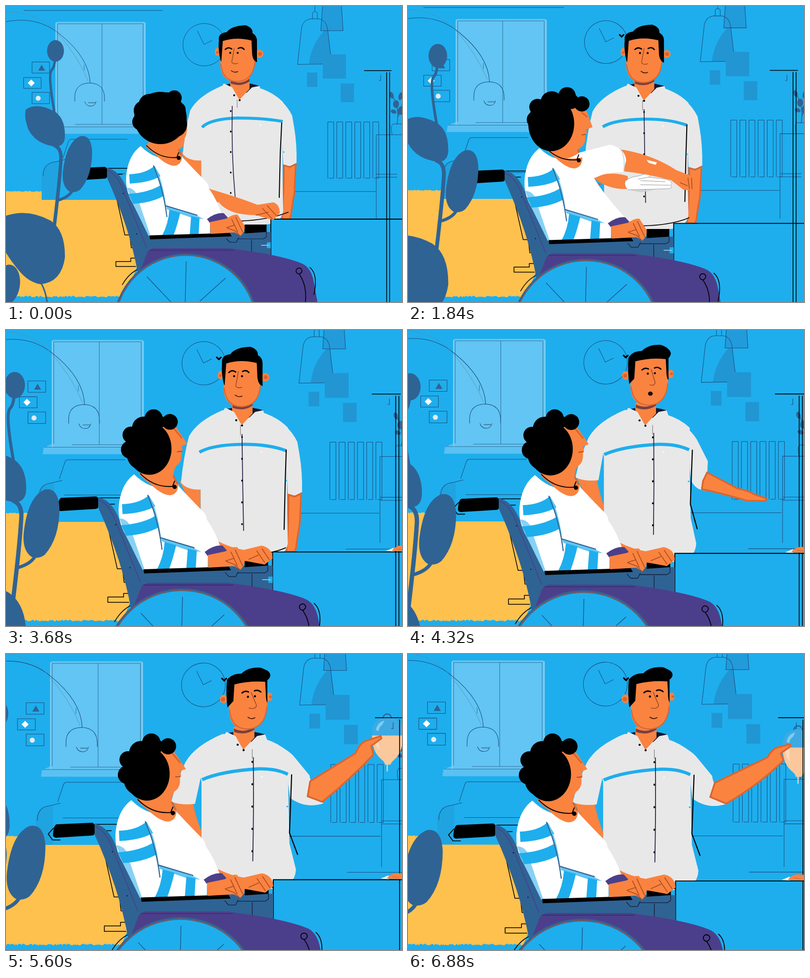
Write an HTML page with a canvas that moves like this. It is 800 px wide and 600 px high and loops after 6960 ms.

```html
<!DOCTYPE html>
<html>
<head>
<meta charset="utf-8">
<style>
html, body { margin: 0; width: 100%; height: 100%; overflow: hidden; background: #1eaeed; }
canvas { display: block; width: 800px; height: 600px; }
</style>
</head>
<body>
<canvas id="stage" width="800" height="600"></canvas>
<script>
const c = document.getElementById('stage').getContext('2d');
const LOOP = 6960, STEP = 80;
const SKY = '#1eaeed', PALE = '#62c5f3', SHADE = '#2196d3', NAVY = '#2f6394', PURPLE = '#4b3f8b',
  SKIN = '#fa8340', DARK = '#d9642f', SHIRT = '#e8e8e8', RUG = '#ffc14d', INK = '#1c4f82', BLACK = '#000';
c.lineCap = c.lineJoin = 'round';

const fill = (d, color) => { c.fillStyle = color; c.fill(new Path2D(d)); };
const line = (d, color = INK, w = 1) => { c.strokeStyle = color; c.lineWidth = w; c.stroke(new Path2D(d)); };
const oval = (x, y, rx, ry, color, turn = 0) => {
  c.fillStyle = color; c.beginPath(); c.ellipse(x, y, rx, ry, turn, 0, 7); c.fill();
};
const dot = (x, y, r, color = BLACK) => oval(x, y, r, r, color);
const box = (x, y, w, h, color) => { c.fillStyle = color; c.fillRect(x, y, w, h); };

// Blend two numbers, or two path strings with the same commands
const NUM = /-?\d+(\.\d+)?/g;
function mix(a, b, k) {
  if (typeof a === 'number') return a + (b - a) * k;
  const to = b.match(NUM);
  let i = 0;
  return a.replace(NUM, n => (+n + (to[i++] - n) * k).toFixed(2));
}
// Keys are time, value, time, value ...
function pose(t, ...keys) {
  let i = 0;
  while (i < keys.length - 2 && t >= keys[i + 2]) i += 2;
  if (i >= keys.length - 2) return keys[i + 1];
  const k = Math.max(0, (t - keys[i]) / (keys[i + 2] - keys[i]));
  return mix(keys[i + 1], keys[i + 3], k * k * (3 - 2 * k));
}
// Slow camera push, each layer with its own depth
const camera = u => (u * u * u - 2 * u * u + u) + (3 * u * u - 2 * u * u * u) + 0.2 * (u * u * u - u * u);
function layer(p, zoom, dx, dy) {
  const s = 1 + (zoom - 1) * p;
  c.setTransform(s, 0, 0, s, dx * p, dy * p);
}
function group(x, y, turn, draw) {
  c.save(); c.translate(x, y); c.rotate(turn); draw(); c.restore();
}

function rug() {
  const rough = x => Math.sin(x * x) * 1.5;
  let d = 'M-40 376';
  for (let x = -38; x <= 72; x += 2) d += `L${x} ${376 + rough(x) * .6}`;
  d += 'V393H268V520L240 590';
  for (let x = 238; x > -40; x -= 2) d += `L${x} ${589 + rough(x)}`;
  fill(d + 'Z', RUG);
}

function room(t, p) {
  layer(p, 1.034, -15.4, -20.1);
  rug();
  line('M36 9H316');
  fill('M72 393V342Q74 318 100 316H120V393Z', '#1fa4e1');
  fill('M105 316H250V393H105Z', SKY);
  line('M75 345Q75 318 100 316L120 311M245 270H132Q128 270 126 275L115 308M125 340H240');
  fill('M84 246L102 238H268V259H82Z', '#5bc1f2');
  fill('M104 32H278Q281 32 281 35V245H101V35Q101 32 104 32Z', PALE);
  line('M104 238V36H277V238M194 36V240M140 240H280M86 245H270', '#31719d');
  line('M101 35V244M281 35V244', '#82d0f5', 2);

  line('M53 113.5H88V136H53ZM36 145H71V167H36ZM53 175H88V198H53Z');
  fill('M72 119L79 131H65Z', NAVY);
  fill('M51 149L58 156L51 163L44 156Z', '#fff');
  dot(65, 187, 5, '#e6eaf0');

  line('M443.5 78.5A43 43 0 1 1 443.5 78.4M387 51L400 78L416 70');
  fill('M612 117Q617 78 643 50L650 50L658 117Z', SHADE);
  fill('M642 -40L636 50H681L675 -40Z', '#229bda');
  line('M589 118L597 45Q600 28 615 26H632Q648 28 650 50L658 117ZM619 26V14Q624 8 629 14V26M624 11V-30M636 50L642 -40M636 50H681L675 -40');
  box(640, 98, 47, 49, SHADE);
  box(608, 135, 21, 29, SHADE);
  box(676, 157, 27, 38, SHADE);
  for (let i = 0; i < 6; i++) {
    const x = 650 + i * 18.2;
    line(`M${x} 349V235H${x + 12}V349H${x + 3}`);
  }
  line('M560 376H747');
  if (t > 1700) line('M682 447H850');

  layer(p, 1.05, -25.6, -20);
  line('M850 261H748V430M748 341H790M748 347H790M780 261Q776 242 782 239H810');
  line('M790 240Q796 205 779 180M792 225Q800 205 802 190', NAVY, 1.5);
  oval(779, 181, 4, 7, NAVY, -.3);
  oval(788, 199, 6, 8, NAVY);
  oval(783, 214, 6, 4, NAVY, .4);
  oval(798, 212, 7, 9, NAVY, .4);
  oval(797, 183, 4, 8, NAVY, .2);

  layer(p, 1.06, -28, -17.4);
  line('M-10 34Q60 16 110 58Q168 105 170 156M139 193V185Q139 157 169 156Q199 157 199 187V193M159 194Q162 203 171 203Q180 203 182 194');
  line('M-10 12Q60 10 100 50Q145 100 166 152', '#5d8aa0', .7);
  line('M167 196H181', '#4a83aa', 2);
  line('M158 119V130', '#1482c6');
}

// The bag tilts while its liquid stays level
function bag(t) {
  if (t < 4300) return;
  const x = pose(t, 4300, 850, 4900, 758, 5000, 756, 5500, 746, 5650, 746, 6300, 760);
  const y = pose(t, 4300, 290, 4900, 252, 5000, 248, 5500, 164, 5650, 164, 6300, 186);
  const tilt = pose(t, 4300, 1, 4960, .9, 5450, 0);
  const skin = new Path2D('M-28 -2V-10Q-25 -33 0 -33Q26 -33 29 -10V-2Q30 30 13 45Q8 49 6 54H-4Q-5 49 -10 45Q-29 30 -28 -2Z');
  group(x, y, 0, () => {
    c.save();
    c.rotate(tilt);
    c.clip(skin);
    c.rotate(-tilt);
    box(-70, -70, 140, 140, '#3fa9e2');
    box(-70, 0, 140, 90, '#fac89c');
    c.restore();
    c.rotate(tilt);
    fill('M-21 -10Q-19 -24 -5 -28L-9 -20Q-15 -16 -16 -8Z', '#7bcdf4');
    fill('M-23 5L-15 3Q-17 18 -14 26Q-23 20 -23 5Z', '#fddabb');
    line('M0 54V66', '#f2d8c2', 2);
    line('M-8 -33Q-6 -40 0 -40Q6 -40 8 -33', NAVY, 2);
  });
}

function manArm(t) {
  const hang = 'M587 318L584 380Q580 400 577 425L574 433L558 433L556 428L558 400Q560 370 560 321L573 325Z';
  const lift = 'M592 285L640 340Q655 350 668 362L690 378L682 384L664 376L650 366Q600 330 575 312L580 298Z';
  const reach = 'M600 261L683 242Q705 228 718 228L754 222L752 230L725 245L711 266Q660 295 602 312L599 288Z';
  const high = 'M602 248L686 196Q695 176 708 172L735 163L737 170L718 184L722 200Q680 245 626 289L597 278Z';
  const hold = 'M606 250L703 203Q712 186 724 184L747 178L747 185L730 197L735 210Q690 255 628 291L597 278Z';
  const arm = pose(t, 0, hang, 3700, hang, 4150, lift, 4600, reach, 4960, reach, 5500, high, 5650, high, 6300, hold);
  const down = 'M515 167Q560 185 578 222L582 245Q588 280 587 320Q572 327 560 323L556 235Z';
  const out = 'M518 170Q556 188 575 215L601 262Q596 290 602 312Q575 312 566 285L560 235Z';
  const up = 'M518 170Q562 188 575 205L602 238Q606 262 628 290Q595 301 566 280L560 235Z';
  bag(t);
  fill(pose(t, 0, down, 3700, down, 4600, out, 4960, out, 5500, up), SHIRT);
  fill(arm, SKIN);
  c.save();
  c.clip(new Path2D(arm));
  line(arm, DARK, 6);
  c.restore();
}

function manHead(t) {
  const look = pose(t, 0, 0, 800, 7, 2900, 7, 3600, 0, 3800, 0, 4500, 0);
  const turn = (a, b) => pose(t, 3800, a, 4500, b);
  const blink = t >= 2560 && t < 2800;
  const talk = t > 4300 && t < 5200 && Math.floor(t / 160) % 2 === 1;
  oval(turn(427, 423), turn(93, 97), turn(5, 7), 8, SKIN);
  oval(turn(512, 508), turn(97, 93), turn(8, 5), 8, SKIN);
  dot(turn(513, 510), turn(97, 93), turn(4, 2.5), DARK);
  dot(turn(427, 422), turn(94, 98), turn(2.5, 4), DARK);
  fill('M433 66V122Q436 154 468 154Q501 152 504 108V62Z', SKIN);
  line('M434 118Q438 153 468 153Q500 151 503 112', DARK, 2);
  fill(turn('M434 112Q428 90 430 70Q428 55 446 53Q455 40 484 39Q499 44 498 55Q508 60 507 74V114Q497 110 497 92L496 70Q465 62 438 71L435 112Z',
    'M430 113Q427 90 429 62Q438 50 456 50Q469 37 492 39Q504 44 506 46Q514 54 504 62V104Q501 100 501 84L500 65Q470 63 443 70L441 101Z'), BLACK);
  group(look, 0, 0, () => {
    line(turn('M443 88Q449 82 456 87M469 86Q476 82 481 88', 'M457 86Q462 81 469 84M480 82Q486 79 492 84'), BLACK, 2.5);
    if (!blink) { dot(turn(453, 468), turn(95, 93), 2); dot(turn(468, 481), turn(95, 92), 2); }
    line(turn('M461 86L456 114Q460 119 468 116', 'M474 85L484 109Q482 117 470 114'), '#a34e26', 1.5);
    if (talk) oval(turn(462, 472), 131, 4.5, 4, '#1b0d0d');
    else line(turn('M455 131Q461 136 468 133', 'M468 131Q474 136 481 132'), '#3c160c', 1.6);
  });
  if (t > 500) line('M420 59L424 63L428 59', BLACK, 3);
}

function man(t) {
  const lean = pose(t, 0, 0, 900, 4, 3700, 4, 4500, 0);
  const C = 4500;
  c.save();
  c.translate(lean, 0);
  const fA = 'M354 296H394Q394 320 394 340V353Q374 342 354 296Z', fC = 'M350 288H386Q392 318 402 342V366Q372 342 350 288Z';
  fill(pose(t, 0, fA, 3700, fA, C, fC), SKIN);
  const tA = 'M436 162Q400 178 385 205L394 250L395 440Q460 452 533 442Q558 436 560 415L559 365L558 235L560 195Q540 175 513 167Z';
  const tC = 'M442 161Q410 172 392 200L402 250L402 440Q460 455 540 448Q575 445 577 413L565 365L562 235L563 195Q545 178 518 170Z';
  const sA = 'M436 162Q388 182 372 212Q362 250 357 300Q370 315 396 313L396 245Q405 200 436 162Z';
  const sC = 'M442 161Q390 182 372 214Q355 250 346 287Q365 294 390 291L400 245Q408 200 442 161Z';
  manArm(t);
  fill(pose(t, 0, tA, 3700, tA, C, tC), SHIRT);
  fill(pose(t, 0, sA, 3700, sA, C, sC), SHIRT);
  c.restore();

  const n = pose(t, 0, 0, 900, 5, 3700, 5, C, 8);
  group(n, 0, 0, () => {
    fill('M438 161Q474 150 512 162L502 176H446Z', '#15162e');
    fill('M453 148V170L472 190L492 168V142Z', SKIN);
    fill('M454 151Q475 161 492 147V153Q474 165 454 157Z', '#77413f');
    fill('M440 157L457 165L470 188V200L440 186L433 168Z', SHIRT);
    fill('M512 162L497 165L488 174L472 190V204L520 185Z', SHIRT);
    dot(461, 181, 2); dot(472, 191, 2);
  });
  line(pose(t, 0, 'M467 190V206', 900, 'M474 190V210', 3700, 'M474 190V210', C, 'M496 190V206'), '#777');

  const stripeA = 'M396 246Q412 229 467 227Q520 227 559 234', stripeB = 'M396 242Q420 228 475 227Q525 226 561 239',
    stripeC = 'M403 246Q440 230 507 226Q540 225 562 236';
  c.lineCap = 'butt';
  line(pose(t, 0, stripeA, 900, stripeB, 3700, stripeB, C, stripeC), SKY, 6);
  c.lineCap = 'round';
  const placketB = 'M477 208Q478 300 480 391', sideB = 'M561 238L559 300L557 389';
  line(pose(t, 0, 'M457 203Q455 300 463 388', 900, placketB, 3700, placketB, C, 'M498 205Q499 300 497 397'), '#2b2148', 1.6);
  line(pose(t, 0, 'M557 237L554 300L552 388', 900, sideB, 3700, sideB, C, 'M569 237L565 345L580 385'), BLACK, 2);
  const bx = pose(t, 0, 454, 900, 477, 3700, 477, C, 496);
  for (let i = 0; i < 5; i++) oval(bx, 213 + i * 41.5, 1.5, 2, BLACK);
  dot(561, 296, 1.5, SKY);
  dot(514, 241, 1.5, '#fff');
  line(pose(t, 0, 'M470 436Q530 434 570 418', 3700, 'M470 438Q530 438 560 424', C, 'M420 440Q500 450 575 444'), BLACK, 1.8);

  const h = pose(t, 0, 0, 800, 9, 3700, 9, C, 20);
  group(h, pose(t, 0, 0, 900, 2, 3700, 2, C, -1), 0, () => manHead(t));
}

function glove(t) {
  const x = pose(t, 0, -110, 250, -110, 850, 0, 2700, 0, 3200, -110);
  if (x < -100) return;
  group(x, 0, 0, () => {
    fill('M376 342Q410 328 445 339L447 364Q410 368 376 342Z', SKIN);
    oval(389, 355, 3, 2, '#a56a45');
    const g = 'M440 349Q450 340 465 339L489 332Q496 334 486 341L520 345Q537 350 529 357Q535 364 520 364L445 366Q437 358 440 349Z';
    fill('M446 366L500 366L470 371Z', '#cfd3d6');
    fill(g, '#fff');
    line(g, '#8a8f94', .8);
    line('M470 348L518 350M470 356L527 357M466 345L486 341', '#7d8287', .8);
  });
}

function table(t) {
  box(535, 432, 400, 260, SKY);
  line('M535 505V432H900', BLACK, 1.8);
  line('M724 131H778M769 135V660M775 135V660', BLACK, 1.5);
  line('M757 140V151H754');
  if (t > 2700) group(pose(t, 2700, 70, 3680, 20, 4960, 5, 6880, 0), 0, 0, () => {
    fill('M730 430L745 424V431Z', '#fff');
    fill('M741 430Q750 418 764 420L800 424V432Z', SKIN);
    line('M752 426L764 428', DARK);
  });
}

function chair(t) {
  line('M204 329H245M210 341H235M219 370L240 464H250L253 490H262M266 511H252V518H222V528H262M235 565Q248 542 268 533', BLACK, 1.4);
  if (t > 4000) line('M128 336L118 347L126 358H140', BLACK, 1.5);
  fill('M133 329L200 326Q204 328 204 332V345Q204 350 198 350L132 354Q126 353 127 347Q128 332 133 329Z', BLACK);
  fill('M204 328Q228 332 243 368L292 466L480 458H535V506L460 494H302L286 522L266 540Q250 450 204 348Z', NAVY);
  line('M205 333Q222 340 234 366L284 490', PURPLE, 1.5);
  fill('M482 443H526V458L482 461Z', BLACK);
  line('M526 443V468L520 472H468M445 471L452 479H465L470 470M496 474V500', '#10203c', 1.2);
  if (t < 4000) {
    fill('M527 479H535V491H527Z', SKY);
    line('M516 485H531', '#a9d4ee', 1.5);
  }
  dot(237, 380, 1); dot(264, 462, 1);

  fill('M268 545L285 500Q290 490 305 491H450Q560 505 600 523Q617 532 622 560L640 660H262Z', PURPLE);
  line('M290 495H460', '#2f2766', 1);
  line('M592 543A6 6 0 1 1 598 537Q597 542 592 543Q608 565 605 600M614 530Q631 545 622 585', BLACK, 1.6);
  dot(363, 648, 144, SKY);
  line('M507 648A144 144 0 1 0 219 648', NAVY, 5);
  line('M506 648A143 143 0 1 0 220 648', '#a8553f', 1.2);
  line('M364 518L362 600M285 549L333 600M443 552L392 598', INK, 1.2);
}

// Head away, towards the glove, then up to the face
function womanHead(t) {
  const turn = (away, down, up) => pose(t, 0, away, 700, down, 2700, down, 3500, up);
  fill('M300 262L350 266L346 288L357 306Q325 328 282 284Z', SKIN);
  line('M347 288L356 306', DARK, 3);
  fill(turn('M325 208Q350 200 358 215L366 250L365 255L364 262L361 268Q360 285 354 288L340 296L300 290L300 230Z',
    'M325 198Q350 200 365 212L376 243L364 247L365 255L362 258Q363 275 355 281L340 292L300 290L300 230Z',
    'M316 191Q340 188 353 196L373 226L363 230L364 239L362 243Q364 260 352 268L341 290L300 284L300 230Z'), SKIN);
  if (t > 480) {
    line(turn('M350 214L360 222', 'M355 214L365 222', 'M347 196L362 214'), DARK, 3);
    line(turn('M355 264L361 263', 'M355 258L362 257', 'M354 241L363 240'), '#8e3f1f', 1.3);
  }
  oval(turn(312, 295, 301), turn(227, 236, 235), turn(53, 45, 42), turn(53, 54, 50), BLACK);
  dot(turn(326, 326, 309), turn(192, 181, 177), 17);
  dot(turn(340, 355, 340), turn(186, 197, 184), 15);
  dot(turn(348, 334, 322), turn(210, 192, 184), turn(15, 15, 11));
  dot(turn(290, 296, 290), turn(200, 194, 196), 22);
  dot(turn(278, 268, 266), turn(212, 203, 209), turn(20, 16, 16));
  dot(turn(272, 264, 264), turn(235, 228, 237), 17);
  dot(turn(340, 285, 288), turn(240, 252, 246), turn(26, 30, 30));
}

function woman(t) {
  const start = 'M350 345L415 372Q470 388 508 403L540 398Q553 402 553 420L540 434L505 424Q450 424 430 398L370 390Z';
  const raised = 'M400 282L440 288Q495 298 540 327L570 339Q578 345 575 368L554 366L530 347Q480 334 440 330L395 320Z';
  const lap = 'M400 395L432 412Q455 424 480 428L514 420Q534 424 535 444L520 456L488 450Q455 446 440 430L400 420Z';
  const fingers = ['M518 410L538 432M528 405L547 426M505 424L530 418', 'M563 343L566 364M570 343L571 364M548 352L562 358', 'M505 430L520 452M515 426L529 447M490 446L508 438'];
  const arm = (a, b, d) => pose(t, 0, a, 850, b, 2700, b, 3450, d);
  fill(arm(start, raised, lap), SKIN);
  line(arm(...fingers), '#a94a20', 1.5);
  if (t > 700 && t < 2900) fill('M482 307L502 312L500 317L486 313Z', '#fff');

  womanHead(t);
  const rest = 'M272 284Q310 322 356 304L358 308Q384 336 405 357L408 362Q410 366 410 370Q426 392 437 425L412 440V466H290L256 400Q238 370 244 335Q250 300 272 284Z';
  const bent = 'M272 284Q310 322 350 293L411 277Q440 285 442 308L436 331Q405 330 379 343Q396 372 440 421L412 440V466H290L256 400Q238 370 244 335Q250 300 272 284Z';
  fill(arm(rest, bent, rest), '#fff');
  if (t > 700 && t < 2900) line('M430 285Q441 300 437 329', '#c8dbe6', 2);
  fill('M284 283Q316 312 356 302Q356 322 340 324Q320 324 284 283Z', SKIN);
  line('M284 283Q310 310 345 307L349 297', BLACK, 1.8);
  dot(349, 308, 4);
  fill('M244 368Q255 368 262 378L292 466H288L256 400Z', '#86d1f5');
  fill('M249 341Q282 340 300 324L312 345Q290 358 250 360Z', SKY);
  fill('M247 381Q290 378 314 362L317 386Q292 399 257 401Z', SKY);
  fill('M300 324Q316 350 323 404L386 425L400 432L372 428L325 412Z', PALE);
  line('M298 324Q318 370 325 427M323 405L386 424', NAVY, 2);
  fill('M330 413L352 419Q346 445 338 466H315Q328 442 330 413Z', SKY);
  fill('M374 426L391 430L389 466H371Z', SKY);
  fill('M290 465L452 460L456 467L291 473Z', BLACK);
  fill('M406 432Q424 418 440 420L450 431L412 440Z', PURPLE);
  fill('M412 438L445 431Q460 421 468 423L482 445Q484 455 474 466L462 459L413 462Z', SKIN);
  line('M447 450L463 456L472 465M456 432L468 458M464 428L478 458M446 449L462 444', '#a94a20', 1.5);
}

function plant() {
  oval(100, 91, 17, 22, NAVY);
  line('M99 108Q98 124 92 130Q84 140 99 222', NAVY, 5);
  fill('M40 210Q60 195 95 212Q120 225 119 265Q118 285 100 285Q60 280 45 250Q36 225 40 210Z', NAVY);
  line('M98 283Q112 288 111 310Q108 360 97 450', NAVY, 7);
  line('M104 394Q130 387 136 370', NAVY, 5.5);
  fill('M150 264Q172 260 174 295Q174 345 150 372Q140 380 128 376Q112 365 115 335Q122 275 150 264Z', NAVY);
  fill('M0 425Q45 410 90 435Q120 455 119 510Q112 560 70 564Q45 560 25 535Q0 505 -10 480Z', NAVY);
  line('M70 560Q82 580 84 610', NAVY, 3);
  oval(3, 565, 25, 41, NAVY, .15);
}

function draw(now) {
  const t = Math.floor(now % LOOP / STEP) * STEP, p = camera(t / LOOP);
  c.setTransform(1, 0, 0, 1, 0, 0);
  box(0, 0, 800, 600, SKY);
  room(t, p);
  layer(p, 1.1, -48, -15);
  man(t);
  glove(t);
  table(t);
  chair(t);
  woman(t);
  layer(p, 1.35, -165, 1);
  plant();
}

let begin;
function tick(now) {
  begin ??= now;
  draw(now - begin);
  requestAnimationFrame(tick);
}
draw(0);
requestAnimationFrame(tick);
</script>
</body>
</html>
```
